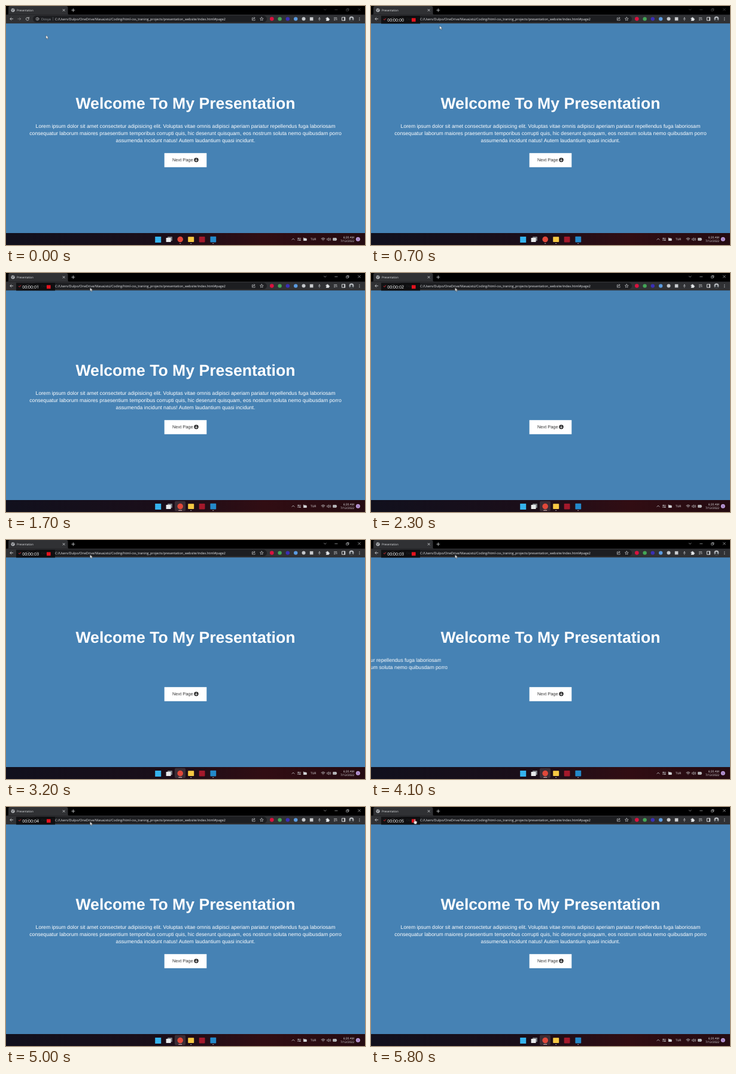
Recreate the animation shown at these times as an HTML page. Size 600x400 px, loop 5.9 s.

```html
<!DOCTYPE html>
<html lang="en">
<head>
<meta charset="utf-8">
<title>Presentation</title>
<style>
  html, body { margin: 0; width: 100%; height: 100%; overflow: hidden; background: #000; }
  svg { display: block; }
  #stage { width: 100vw; height: 100vh; }
  text { text-rendering: geometricPrecision; white-space: pre; }
  .ui { font-family: "Open Sans", "Noto Sans", sans-serif; fill: #e8eaed; }
  .page { font-family: "Liberation Sans", Arial, sans-serif; fill: #fff; }
  .line { fill: none; stroke: #d5d7da; stroke-width: .8; stroke-linecap: round; stroke-linejoin: round; }
  .dim { opacity: .45; }

  .anim { animation: 5.9s linear infinite; }
  .step { animation-timing-function: step-end; }
  #heading { animation-name: drop; }
  #para { animation-name: slide; }
  #focus { animation-name: select; }
  #active { animation-name: activate; }
  #controls { animation-name: brighten; }
  #recorder { animation-name: appear; }
  #seconds { animation-name: tick; }
  #pointer { animation-name: travel; }
  #arrow { animation-name: arrow; }
  #hand { animation-name: hand; }

  @keyframes drop {
    0% { transform: none; animation-timing-function: step-end; }
    30.42%, 37.17% { transform: translateY(-625px); }
    54.12%, 100% { transform: none; }
  }
  @keyframes slide {
    0% { transform: none; animation-timing-function: step-end; }
    30.42%, 64.29% { transform: translateX(-625px); }
    81.24%, 100% { transform: none; }
  }
  @keyframes select {
    0% { opacity: 0; }
    20.17% { opacity: 1; }
    25.25%, 100% { opacity: 0; }
  }
  @keyframes activate {
    0% { opacity: 0; }
    20.17%, 100% { opacity: 1; }
  }
  @keyframes brighten {
    0% { opacity: .4; }
    20.17%, 100% { opacity: 1; }
  }
  @keyframes appear {
    0% { opacity: 0; }
    1.53%, 100% { opacity: 1; }
  }
  @keyframes tick {
    0% { transform: none; }
    20.17% { transform: translateY(-12px); }
    37.12% { transform: translateY(-24px); }
    54.07% { transform: translateY(-36px); }
    71.02% { transform: translateY(-48px); }
    87.97%, 100% { transform: translateY(-60px); }
  }
  @keyframes travel {
    0%, 1% { transform: translate(66.8px, 48.8px); animation-timing-function: ease-in-out; }
    19.5%, 87.3% { transform: translate(140.5px, 24.4px); animation-timing-function: ease-in-out; }
    97.5%, 100% { transform: translate(72.3px, 20.2px); }
  }
  @keyframes arrow {
    0% { opacity: 1; }
    95.5%, 100% { opacity: 0; }
  }
  @keyframes hand {
    0% { opacity: 0; }
    95.5%, 100% { opacity: 1; }
  }
</style>
</head>
<body>
<svg id="stage" viewBox="0 0 600 400">
  <defs>
    <linearGradient id="bar">
      <stop offset="0" stop-color="#11101d"/>
      <stop offset=".45" stop-color="#1b0e19"/>
      <stop offset=".72" stop-color="#310d13"/>
      <stop offset="1" stop-color="#240b11"/>
    </linearGradient>
    <linearGradient id="portrait" x2="0" y2="1">
      <stop offset="0" stop-color="#c9ccd0"/>
      <stop offset="1" stop-color="#6f757b"/>
    </linearGradient>
  </defs>

  <!-- web page -->
  <rect y="29" width="600" height="351" fill="#4682b4"/>
  <g class="page" text-anchor="middle">
    <text id="heading" class="anim" x="300" y="172.3" font-size="26.6" font-weight="bold">Welcome To My Presentation</text>
    <g id="para" class="anim" font-size="8.68">
      <text x="300" y="203.6">Lorem ipsum dolor sit amet consectetur adipisicing elit. Voluptas vitae omnis adipisci aperiam pariatur repellendus fuga laboriosam</text>
      <text x="300" y="215.6">consequatur laborum maiores praesentium temporibus corrupti quis, hic deserunt quisquam, eos nostrum soluta nemo quibusdam porro</text>
      <text x="300" y="227.6">assumenda incidunt natus! Autem laudantium quasi incidunt.</text>
    </g>
  </g>
  <rect x="264.7" y="246.2" width="70.6" height="23.6" fill="#fff"/>
  <text class="page" x="278" y="260.4" font-size="7.4" style="fill:#333">Next Page</text>
  <circle cx="318" cy="257.6" r="3.7" fill="#222"/>
  <path d="M318 255.3v4.2M316 257.7l2 2 2-2" fill="none" stroke="#fff" stroke-width="1"/>

  <!-- tab strip -->
  <rect width="600" height="14.5" fill="#000"/>
  <path d="M2 14.5q2 0 2-2V3q0-3 3-3H100.500q3 0 3 3v9.500q0 2 2 2z" fill="#303134"/>
  <g class="line" stroke-width=".6">
    <circle cx="11.600" cy="7" r="2.700" fill="#a4a7ab"/>
    <path d="M9.500 6.200l2 .8-.3 1.800M12 4.600l.4 1.300 1.700.6" style="stroke:#45474a"/>
    <path d="M95 5.400l3.200 3.200M98.200 5.400L95 8.600M109.800 7h5M112.300 4.500v5"/>
  </g>
  <text class="ui" x="18" y="8.700" font-size="4.700">Presentation</text>
  <g id="controls" class="anim step">
    <path class="line" d="M531.500 5.300l1.800 1.600 1.800-1.600M549.700 6.200h4.200M569 5.300h3v3h-3zM570 5.300V4.300h3v3h-1M588.500 4l4 4M592.500 4l-4 4" style="stroke-width:.6"/>
  </g>

  <!-- toolbar -->
  <rect y="14.500" width="600" height="14.700" fill="#303134"/>
  <rect x="45" y="16" width="391" height="11.200" rx="5.600" fill="#1d1e21"/>
  <g class="line">
    <path d="M11.700 21.600H7M9 19.500l-2.200 2.100L9 23.700"/>
    <path class="dim" d="M19.800 21.600h4.700M22.500 19.500l2.200 2.100-2.200 2.100"/>
    <path d="M38 20.300a2.500 2.500 0 1 0 .3 2M38.300 18.800v1.800h-1.800"/>
    <circle cx="52.500" cy="21.600" r="2.400" style="stroke-width:.6"/>
    <path d="M52.500 21.400v1.400M52.500 20.200v.1" style="stroke-width:.7"/>
    <path d="M78.500 19v5.200" style="stroke:#66696d;stroke-width:.6"/>
  </g>
  <text class="ui" x="59" y="23.600" font-size="5.500" style="fill:#9aa0a6">Dosya</text>
  <g id="focus" class="anim step">
    <rect x="45.300" y="16.300" width="390.400" height="10.600" rx="5.300" fill="none" stroke="#8ab4f8" stroke-width=".9"/>
    <rect x="82" y="17.800" width="286.500" height="7.800" fill="#4d6a94"/>
  </g>
  <text class="ui" x="82" y="23.600" font-size="5.510">C:/Users/Dulpo/OneDrive/Masaüstü/Coding/html-css_traning_projects/presentation_website/index.html#page2</text>
  <g class="line" style="stroke-width:.65">
    <path d="M413 19.800h-1.600v4.200h4.700v-1.300M412.700 22.400q.3-2.300 2.900-2.400M414.600 18.700l1.600 1.300-1.600 1.400"/>
    <path d="M427.300 18.800l.85 1.850 2 .2-1.500 1.350.4 2-1.750-1-1.750 1 .4-2-1.500-1.350 2-.2z"/>
  </g>
  <circle cx="444.300" cy="21.600" r="3.300" fill="#d9123f"/>
  <circle cx="457.600" cy="21.600" r="3.200" fill="#43a657"/>
  <circle cx="470.800" cy="21.600" r="3.200" fill="#3a2fb5"/>
  <circle cx="484.200" cy="21.600" r="3.200" fill="#5b9be0"/>
  <circle cx="497.500" cy="21.600" r="3" fill="#c3c6ca"/>
  <rect x="507.800" y="18.800" width="5.600" height="5.600" fill="#c9cbce"/>
  <g class="line" style="stroke-width:.7">
    <rect x="523" y="18.800" width="1.600" height="3" rx=".8" fill="#a6a9ad" stroke="none"/>
    <path d="M522.200 21.300q0 1.600 1.600 1.600t1.600-1.600M523.800 23v1.500" style="stroke:#a6a9ad"/>
    <path d="M535.200 20.200h1.200q0-1.300.9-1.300t.9 1.300h1.200v1.300q1.300 0 1.300.9t-1.300.9v1.100h-4.200v-1.300q1 0 1-.8t-1-.8z" fill="#e8eaed"/>
    <path d="M548.300 19.600h4.500M548.300 21.600h3M548.300 23.600h2M552.800 21v2.500"/>
    <path d="M561.800 19h5v5.200h-5zM565.500 19v5.200" style="stroke-width:1"/>
  </g>
  <circle cx="577.400" cy="21.600" r="4" fill="url(#portrait)"/>
  <path d="M574.600 24.500q.5-1.900 2.100-2a1.500 1.500 0 1 1 1.400 0q1.600.1 2.100 2-2.800 2-5.600 0z" fill="#33373b"/>
  <g fill="#e0e2e5">
    <circle cx="590.800" cy="19.500" r=".6"/>
    <circle cx="590.800" cy="21.600" r=".6"/>
    <circle cx="590.800" cy="23.700" r=".6"/>
  </g>

  <!-- taskbar -->
  <rect y="380" width="600" height="20" fill="url(#bar)"/>
  <g id="active" class="anim step">
    <rect x="282" y="381.800" width="18" height="16.600" rx="2" fill="#fff" fill-opacity=".13"/>
    <rect x="288.200" y="396.800" width="6" height="1.200" rx=".6" fill="#d9a3a0"/>
  </g>
  <rect x="249.200" y="386" width="10" height="10" fill="#35b3ee"/>
  <rect x="270" y="386" width="8" height="7" rx=".6" fill="#77797f"/>
  <rect x="267.600" y="388" width="8" height="7" rx=".6" fill="#e9eaec"/>
  <circle cx="291.200" cy="390.600" r="4.800" fill="#e0483a"/>
  <rect x="304.200" y="386.200" width="10" height="8.800" rx=".8" fill="#f6c843"/>
  <rect x="322.700" y="386" width="9.800" height="9.400" rx=".8" fill="#a3192b"/>
  <rect x="341.400" y="385.800" width="9.800" height="9.800" rx=".8" fill="#2489ca"/>
  <g fill="#a8a3a9">
    <rect x="290" y="396.900" width="2.400" height="1" rx=".5"/>
    <rect x="308" y="396.900" width="2.400" height="1" rx=".5"/>
    <rect x="345" y="396.900" width="2.400" height="1" rx=".5"/>
  </g>
  <g class="line">
    <path d="M478 391.200l2-2 2 2"/>
    <path d="M487.300 389h5.400M487.300 391.800h5.400M488.800 388.200v1.600M491.200 391v1.600"/>
    <path d="M497.300 388v4.500h5v-3M499 391v-1.500M500.800 391v-2.500" fill="#d5d7da"/>
    <path d="M527 389.300q3-2.600 6 0M528.200 390.800q1.800-1.500 3.600 0M529.900 392.300h.2"/>
    <path d="M537 389.300h1.100l1.500-1.300v4.800l-1.500-1.300H537zM541 389.300q.8 1.100 0 2.200M542.200 388.300q1.600 2.100 0 4.200" style="stroke-width:.6"/>
    <path d="M547 388.600h5v3.600h-5zM552.600 390v.9" fill="#aeb0b3"/>
  </g>
  <g class="ui" font-size="4.870">
    <text x="509" y="392.200" font-size="4.900">TUR</text>
    <g text-anchor="end">
      <text x="582" y="388.700">6:20 AM</text>
      <text x="582" y="395.400">7/12/2022</text>
    </g>
  </g>
  <circle cx="588.300" cy="390.300" r="3.500" fill="#b897d6"/>
  <text class="ui" x="588.300" y="391.800" font-size="4.200" text-anchor="middle" style="fill:#24142f">1</text>

  <!-- recording timer -->
  <g id="recorder" class="anim step">
    <rect x="17" y="16.400" width="65" height="13.200" fill="#0b0b0d" fill-opacity=".82"/>
    <path d="M21 22l1.400 1.500 2.500-3" fill="none" stroke="#d0202a" stroke-width="1"/>
    <text class="ui" x="51" y="25.900" font-size="7" text-anchor="end" style="fill:#fff">00:00:0</text>
    <svg x="51" y="18" width="6" height="10" viewBox="0 0 6 10" overflow="hidden">
      <text id="seconds" class="ui anim step" font-size="7" style="fill:#fff"><tspan x="0" y="7.900">0</tspan><tspan x="0" y="19.900">1</tspan><tspan x="0" y="31.900">2</tspan><tspan x="0" y="43.900">3</tspan><tspan x="0" y="55.900">4</tspan><tspan x="0" y="67.900">5</tspan></text>
    </svg>
    <rect x="68" y="20.300" width="6.600" height="6" fill="#e5121d"/>
  </g>

  <!-- mouse pointer -->
  <g id="pointer" class="anim" fill="#fff" stroke="#222" stroke-width=".4" stroke-linejoin="round">
    <path id="arrow" class="anim step" d="M0 0v6l1.400-1.200 1 2.300 1.100-.5-1-2.200h1.900z"/>
    <path id="hand" class="anim step" d="M0 .6q.7-.9 1.300 0v2.600l2.700.6q.7.300.6 1l-.5 2.100-.6 1.400H.6L-1.500 5.500q-.3-.8.500-.8l1 .7z"/>
  </g>
</svg>
</body>
</html>
```
